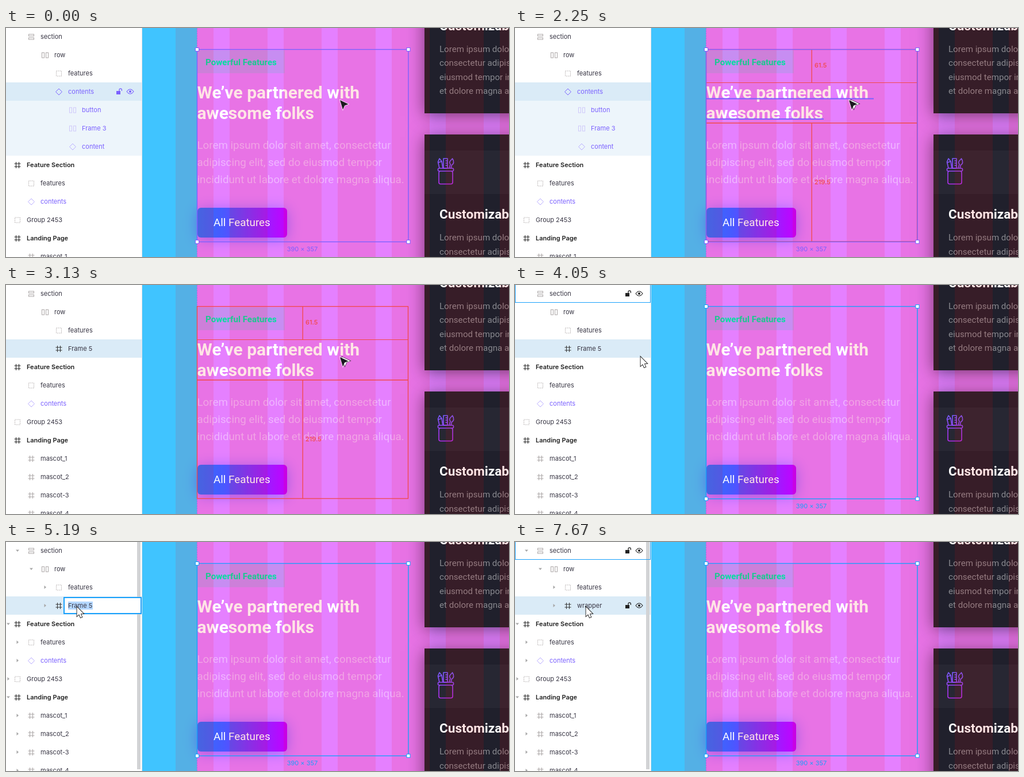
Recreate the animation shown at these times as an HTML page with a canvas. Size 875x400 px, loop 9140 ms.

```html
<!DOCTYPE html>
<html lang="en">
<head>
<meta charset="utf-8">
<title>Layers</title>
<style>
html, body { margin: 0; width: 100%; height: 100%; overflow: hidden; background: #fff; }
canvas { display: block; }
</style>
</head>
<body>
<canvas id="stage" width="875" height="400"></canvas>
<script>
const LOOP = 9140;
const BLUE = '#18a0fb', PURPLE = '#7b61ff', RED = '#f24848', INK = '#383644', GREY = '#aaa5a5';
const UI = 'Inter, sans-serif', BODY = 'Roboto, sans-serif';
const ctx = document.getElementById('stage').getContext('2d');
let g = ctx;

function rect(x, y, w, h, fill) {
  g.fillStyle = fill;
  g.fillRect(x, y, w, h);
}

function frame(x, y, w, h, color, width = 1) {
  g.strokeStyle = color;
  g.lineWidth = width;
  g.strokeRect(x, y, w, h);
}

function text(str, x, y, font, fill) {
  g.font = font;
  g.fillStyle = fill;
  g.fillText(str, x, y);
}

function path(points, closed) {
  g.beginPath();
  for (let i = 0; i < points.length; i += 2) g.lineTo(points[i], points[i + 1]);
  if (closed) g.closePath();
}

function line(x1, y1, x2, y2, color, width = 1) {
  path([x1, y1, x2, y2]);
  g.strokeStyle = color;
  g.lineWidth = width;
  g.stroke();
}

// The web page being edited
function shadow(color, blur, dy) {
  g.shadowColor = color;
  g.shadowBlur = blur;
  g.shadowOffsetY = dy;
}

function card(y, h) {
  g.save();
  shadow('rgba(20,16,40,.6)', 28, 4);
  rect(728, y, 200, h, '#20202c');
  g.restore();
}

function cardText(y) {
  text('Customizable', 754, y, '700 22.6px ' + BODY, '#fff');
  ['Lorem ipsum dolor sit', 'consectetur adipiscing', 'eiusmod tempor incididunt', 'et dolore magna aliqua']
    .forEach((s, i) => text(s, 754, y + 38 + i * 24.5, '15.09px ' + BODY, 'rgba(255,255,255,.47)'));
}

function toolCup() {
  const ink = g.createLinearGradient(0, 227, 0, 273);
  ink.addColorStop(0, '#7a5cff');
  ink.addColorStop(1, '#b52cf0');
  g.strokeStyle = ink;
  g.lineWidth = 1.6;
  g.lineJoin = 'round';
  g.beginPath();
  g.roundRect(751.5, 245, 27, 5, 2);
  g.roundRect(753, 250, 24, 22.5, 3);
  g.stroke();
  path([754, 245, 751.5, 234, 754, 228, 758, 233, 760, 245]);
  g.stroke();
  path([752, 235, 758, 233]);
  g.stroke();
  g.strokeRect(761, 228, 7, 17);
  for (let y = 232; y < 244; y += 4) {
    path([764.5, y, 768, y]);
    g.stroke();
  }
  g.beginPath();
  g.moveTo(771, 245);
  g.lineTo(773, 238);
  g.bezierCurveTo(769, 233, 775, 231, 776.5, 228);
  g.bezierCurveTo(780, 233, 779, 238, 775.5, 239);
  g.lineTo(774, 245);
  g.stroke();
}

function drawPage() {
  rect(237, 0, 95, 400, '#40c4ff');
  rect(332, 0, 543, 400, '#e580ff');
  card(-60, 209);
  card(186, 260);
  rect(728, 214, 147, 76, 'rgba(255,255,255,.03)');
  cardText(3.5);
  cardText(333);
  toolCup();

  rect(333, 39, 152, 40, 'rgba(20,215,165,.14)');
  text('Powerful Features', 347, 64.5, '700 15.09px ' + BODY, '#00e0a0');
  text('We’ve partnered with', 332.5, 123, '700 30px ' + BODY, '#fff');
  text('awesome folks', 332.5, 159, '700 30px ' + BODY, '#fff');
  ['Lorem ipsum dolor sit amet, consectetur', 'adipiscing elit, sed do eiusmod tempor',
    'incididunt ut labore et dolore magna aliqua.']
    .forEach((s, i) => text(s, 332.5, 211 + i * 30.2, '18.76px ' + BODY, 'rgba(255,255,255,.42)'));

  const fill = g.createLinearGradient(333, 0, 489, 0);
  fill.addColorStop(0, '#3070fa');
  fill.addColorStop(.3, '#4a58ff');
  fill.addColorStop(1, '#c400ff');
  g.save();
  shadow('rgba(70,70,255,.5)', 24, 3);
  g.fillStyle = fill;
  g.beginPath();
  g.roundRect(333, 314, 156, 52, 6);
  g.fill();
  g.restore();
  text('All Features', 361, 346, '18.8px ' + BODY, '#fff');

  for (let x = 295; x < 875; x += 94) rect(x, 0, 66, 400, 'rgba(255,0,0,.1)');
  g.setLineDash([1, 2]);
  line(332.5, 0, 332.5, 400, '#4f6fe0');
  g.setLineDash([]);
}

// Canvas overlays
function selection(color) {
  frame(332.5, 37.5, 367.5, 336, color, 1.4);
  for (const x of [332.5, 700]) {
    for (const y of [37.5, 373.5]) {
      rect(x - 3, y - 3, 6, 6, '#fff');
      frame(x - 3, y - 3, 6, 6, color);
    }
  }
  g.textAlign = 'center';
  text('390 × 357', 515.5, 390, '11px ' + UI, color);
  g.textAlign = 'left';
}

function measures() {
  frame(332.5, 37.5, 367, 335.5, RED, 1.3);
  line(333, 95.5, 700, 95.5, RED);
  line(333, 166, 700, 166, RED, 1.5);
  line(516.2, 38, 516.2, 95, RED, 1.3);
  line(516.2, 166, 516.2, 373, RED, 1.3);
  text('61.5', 521, 69, '500 11px ' + UI, RED);
  text('219.5', 521, 272.5, '500 11px ' + UI, RED);
}

// Layer icons
const icons = {
  stack(x, y) {
    g.strokeRect(x - 4.5, y - 4.5, 9, 3);
    g.strokeRect(x - 4.5, y + 1.5, 9, 3);
  },
  cols(x, y) {
    g.strokeRect(x - 5.5, y - 4.5, 4, 9);
    g.strokeRect(x + 1.5, y - 4.5, 4, 9);
  },
  group(x, y) {
    g.setLineDash([1.5, 1.5]);
    g.strokeRect(x - 4.5, y - 4.5, 9, 9);
    g.setLineDash([]);
  },
  comp(x, y) {
    path([x, y - 5.5, x + 5.5, y, x, y + 5.5, x - 5.5, y], true);
    g.stroke();
  },
  hash(x, y) {
    for (const d of [-2.5, 2.5]) {
      path([x + d, y - 5.5, x + d, y + 5.5]);
      g.stroke();
      path([x - 5.5, y + d, x + 5.5, y + d]);
      g.stroke();
    }
  }
};

function caret(x, y, open) {
  path(open ? [x - 3, y - 1.5, x + 3, y - 1.5, x, y + 2] : [x - 1.5, y - 3, x + 2, y, x - 1.5, y + 3], true);
  g.fillStyle = '#a8a8a8';
  g.fill();
}

function lockAndEye(y, color) {
  rect(192, y - 1, 7, 6, color);
  g.strokeStyle = g.fillStyle = color;
  g.lineWidth = 1.2;
  g.beginPath();
  g.moveTo(197, y - 1);
  g.lineTo(197, y - 3);
  g.arc(199.2, y - 3, 2.2, Math.PI, 0);
  g.lineTo(201.4, y - 1);
  g.stroke();
  g.beginPath();
  g.moveTo(210, y);
  g.quadraticCurveTo(216, y - 8, 222, y);
  g.quadraticCurveTo(216, y + 8, 210, y);
  g.stroke();
  g.beginPath();
  g.arc(216, y, 2, 0, 7);
  g.fill();
}

// Each layer: name, icon, icon x, icon color, text color, open
const layer = (name, icon, x, tint = GREY, color = INK, open = false) => ({ name, icon, x, tint, color, open });
const bold = name => layer(name, 'hash', 20, '#222', '#222', true);
const top3 = [layer('section', 'stack', 44, GREY, INK, true), layer('row', 'cols', 68, GREY, INK, true),
  layer('features', 'group', 92)];
const rest = [bold('Feature Section'), layer('features', 'group', 44), layer('contents', 'comp', 44, '#b9acff', PURPLE),
  layer('Group 2453', 'group', 20), bold('Landing Page'),
  ...['mascot_1', 'mascot_2', 'mascot-3', 'mascot_4'].map(s => layer(s, 'hash', 44))];
const before = [...top3, layer('contents', 'comp', 92, PURPLE, PURPLE),
  layer('button', 'cols', 116, '#cfc8fa', PURPLE), layer('Frame 3', 'cols', 116, '#cfc8fa', PURPLE),
  layer('content', 'comp', 116, '#b9acff', PURPLE), ...rest];
const after = name => [...top3, layer(name, 'hash', 92, '#333'), ...rest];

function layers(list, carets) {
  list.forEach((l, i) => {
    const y = 15 + 32 * i;
    if (y > 410) return;
    g.strokeStyle = l.tint;
    g.lineWidth = 1;
    icons[l.icon](l.x, y + .5);
    const weight = l.tint === '#222' ? '600 ' : '';
    text(l.name, l.x + 16, y + 4, weight + '11px ' + UI, l.color);
    if (carets) caret(l.x === 20 ? 4 : l.x - 24, y, l.open);
  });
}

function renameBox(t) {
  const keys = [5790, 6110, 6190, 6410, 6970, 7120, 7270];
  const typed = 'wrapper'.slice(0, keys.filter(k => t >= k).length);
  rect(100, 96, 136, 30, '#fff');
  frame(101, 97, 134, 28, BLUE, 2);
  if (!typed) rect(108, 104, 43, 14, '#b4d7ff');
  text(typed || 'Frame 5', 108, 115, '11px ' + UI, INK);
  if (typed) rect(108 + Math.round(g.measureText(typed).width), 104, 1, 14, '#000');
}

function panel(t, step) {
  const framed = t >= 2720, inside = step >= 5;
  rect(0, 0, 236, 400, '#fff');
  rect(236, 0, 1, 400, '#e2e2e6');
  rect(0, 95, 236, 32, '#daebf7');
  if (!framed) rect(0, 127, 236, 96, '#edf5fb');
  layers(framed ? after(t >= 7500 ? 'wrapper' : 'Frame 5') : before, inside);
  if (inside) rect(228, 0, 6, 397, '#d2d3d5');

  if (t < 2170) lockAndEye(111, PURPLE);
  if ((t >= 3270 && step < 1) || step >= 6) lockAndEye(111, '#222');
  if ((step >= 3 && step < 6) || t >= 7670) {
    frame(.5, -1.5, 235, 32, BLUE);
    lockAndEye(15, '#222');
  }
  if (t >= 4770 && t < 5020) frame(.5, 31.5, 235, 31, BLUE);
  if (t >= 4770 && t < 4950) rect(60, 126, 176, 2, '#000');
  if (t >= 5190 && t < 7500) renameBox(t);
}

// Pointers
function pointer(x, y, points, fill, stroke, width) {
  g.save();
  g.translate(x, y);
  path(points, true);
  g.lineJoin = 'miter';
  g.strokeStyle = stroke;
  g.lineWidth = width;
  g.stroke();
  g.fillStyle = fill;
  g.fill();
  g.restore();
}

const DART = [0, 0, 14.5, 7, 8, 9.5, 5, 16.5];
const ARROW = [0, 0, 0, 16, 3.7, 12.8, 6.2, 18.6, 8.8, 17.5, 6.3, 11.8, 11.3, 11.5];

function cursor(t, step) {
  if (step < 0) {
    if (t >= 2170 && t < 3200) pointer(584.5, 125.5, DART, '#fff', '#222', 1.2);
    pointer(581, 126, DART, '#1c1820', 'rgba(255,255,255,.85)', 1.6);
    return;
  }
  const a = Math.min(1, (step + 1) / 5), b = Math.max(0, (step - 4) / 5);
  const out = b * (2 - b);
  const x = 580 - 362 * a * a * (3 - 2 * a) - 95 * out, y = 125 - 12 * out;
  if (x > 237) pointer(x, y, DART, '#1c1820', 'rgba(255,255,255,.85)', 1.6);
  else pointer(x + .5, y + .5, ARROW, '#fff', '#222', 1.8);
}

const page = document.createElement('canvas');
page.width = 875;
page.height = 400;
g = page.getContext('2d');
drawPage();
g = ctx;

function draw(t) {
  const step = t < 3730 ? -1 : Math.min(9, Math.floor((t - 3730) / 78.8));
  g.drawImage(page, 0, 0);
  if (t >= 2250 && t < 3200) measures();
  if (t >= 2170 && t < 2720) {
    rect(333, 122.5, 291, 2, PURPLE);
    rect(333, 158, 204, 2, PURPLE);
  }
  if (t < 2720) selection(PURPLE);
  else if (t >= 3270) selection(BLUE);
  panel(t, step);
  cursor(t, step);
}

const start = performance.now();
function tick() {
  draw((performance.now() - start) % LOOP);
  requestAnimationFrame(tick);
}
tick();
</script>
</body>
</html>
```
